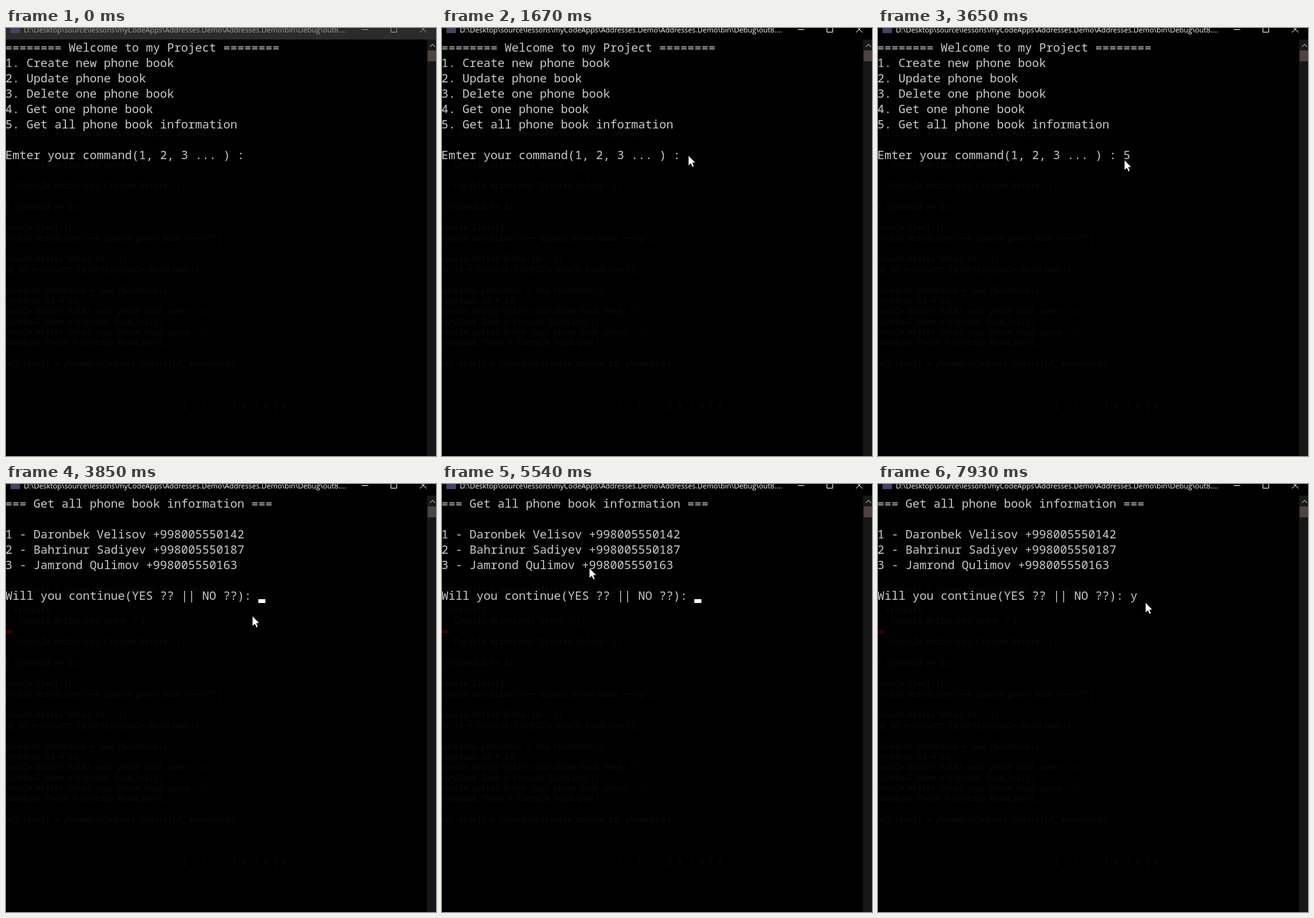
Recreate the animation shown at these times as an HTML page. Size 673 px wide and 669 px high, loop 8 s.

```html
<!DOCTYPE html>
<html lang="en">
<head>
<meta charset="utf-8">
<title>Console</title>
<style>
  html, body { margin: 0; width: 100%; height: 100%; overflow: hidden; background: #000; }
  svg { display: block; width: 100%; height: 100%; }
  text { white-space: pre; }
  .out { font: 18.333px "Noto Sans Mono", "DejaVu Sans Mono", monospace; fill: #ccc; }
  .ghost { font: 11.8px "Noto Sans Mono", "DejaVu Sans Mono", monospace; fill: #0d0d0d; }
  .title { font: 11.35px "Open Sans", "Noto Sans", sans-serif; }
</style>
</head>
<body>
<svg viewBox="0 0 673 669" preserveAspectRatio="none">
  <rect width="673" height="669" fill="#000"/>
  <g id="ghost" class="ghost"></g>
  <g id="ghost2" class="ghost">
    <text x="12" y="201">(result)</text>
    <rect y="228" width="10" height="6" fill="#300000"/>
  </g>

  <rect id="bar" width="673" height="18"/>
  <rect x="7" y="-7" width="15" height="15" fill="#4a3f6b"/>
  <text id="title" class="title" x="28" y="7">D:\Desktop\source\lessons\myCodeApps\Addresses.Demo\Addresses.Demo\bin\Debug\out8....</text>
  <path id="buttons" d="M557 2.5H567M602.5 -3V6.5H611.5V-3M648 -3L658 7M658 -3L648 7" fill="none"/>

  <rect x="659" y="18" width="14" height="651" fill="#171717"/>
  <path d="M663.5 29.5L667.5 25.5L671.5 29.5" fill="none" stroke="#868686" stroke-width="1.5"/>
  <rect x="660" y="35" width="13" height="17" fill="#4d4340"/>

  <g id="menu" class="out"></g>
  <g id="list" class="out"></g>
  <text id="typed" class="out"></text>
  <rect id="caret" width="11" height="6" fill="#fff"/>
  <path id="mouse" d="M0 0V16.5L3.8 12.9L6.3 18.5L9 17.3L6.6 11.8H11.5Z" fill="#fff" stroke="#000" stroke-width=".8"/>
</svg>
<script>
const LOOP = 8000, CELL = 11, LINE = 24;
const ENTRY = 320, FOCUS = 1540, ENTER = 3520, LIST = 3780, ANSWER = 7930;
const BLINK = 527, BLINK_ON = 2078;

const $ = id => document.getElementById(id);
const set = (el, attrs) => { for (const k in attrs) el.setAttribute(k, attrs[k]); };
const show = (el, on) => set(el, { visibility: on ? "visible" : "hidden" });
const column = n => n * CELL - 1;
const baseline = row => 37 + row * LINE;

function print(id, lines, x, top, pitch) {
  lines.forEach((line, row) => {
    if (!line) return;
    const el = document.createElementNS("http://www.w3.org/2000/svg", "text");
    set(el, { x, y: top + row * pitch });
    el.textContent = line;
    $(id).append(el);
  });
}

const menu = [
  "======== Welcome to my Project ========",
  "1. Create new phone book",
  "2. Update phone book",
  "3. Delete one phone book",
  "4. Get one phone book",
  "5. Get all phone book information",
  "",
  "Emter your command(1, 2, 3 ... ) : "
];
const list = [
  "=== Get all phone book information ===",
  "",
  "1 - Daronbek Velisov +998005550142",
  "2 - Bahrinur Sadiyev +998005550187",
  "3 - Jamrond Qulimov +998005550163",
  "",
  "Will you continue(YES ?? || NO ??): "
];
print("menu", menu, column(0), baseline(0), LINE);
print("list", list, column(0), baseline(0), LINE);

// Faint editor showing through the window
print("ghost", [
  "bool result = phoneBookService.Add(id, phoneBook);",
  "", "",
  '    Console.WriteLine("Great !");',
  "",
  '    Console.WriteLine("Created before!");',
  "",
  "if (command == 2)",
  "",
  "Console.Clear();",
  'Console.WriteLine("=== Update phone book ===\\n");',
  "",
  'Console.Write("Enter id: ");',
  "int id = Convert.ToInt32(Console.ReadLine());",
  "",
  "PhoneBook phoneBook = new PhoneBook();",
  "phoneBook.Id = id;",
  'Console.Write("Enter your phone book name: ");',
  "phoneBook.Name = Console.ReadLine();",
  'Console.Write("Enter your phone book phone: ");',
  "phoneBook.Phone = Console.ReadLine();",
  "",
  "bool result = phoneBookService.Update(id, phoneBook);"
], -9, 169, 16.37);
print("ghost", ["- |   |      | ≡  | m | o"], 262, 594, 0);

// Pointer moves: start, end, target x, target y
const moves = [
  [ENTRY, 800, 386, 174],
  [1000, 1200, 386, 199],
  [2080, 2610, 386, 206],
  [4510, 4790, 113, 123],
  [5120, 5540, 231, 131],
  [5540, 5890, 262, 115],
  [5960, 6100, 200, 68],
  [6100, 6300, 170, 163],
  [6300, 6720, 385, 177],
  [6720, 6930, 419, 185]
];
const ease = k => k * k * (3 - 2 * k);

function pointer(t) {
  let x = 598, y = 645;
  for (const [from, to, tx, ty] of moves) {
    const k = ease(Math.min(1, Math.max(0, (t - from) / (to - from))));
    x += (tx - x) * k;
    y += (ty - y) * k;
  }
  return [Math.round(x), Math.round(y)];
}

function caretOn(t) {
  const justPrinted = t >= LIST && t < LIST + BLINK;
  const lit = Math.floor((t - BLINK_ON) / BLINK) % 2 === 0;
  return t >= FOCUS && (justPrinted || lit);
}

function typedAt(t) {
  if (t >= ANSWER) return "y";
  return t >= ENTER && t < LIST ? "5" : "";
}

function draw(t) {
  const active = t >= FOCUS, listed = t >= LIST;
  set($("bar"), { fill: active ? "#000" : "#2b2b2b" });
  set($("title"), { fill: active ? "#fff" : "#a6a6a6" });
  set($("buttons"), { stroke: active ? "#fff" : "#a0a0a0" });

  show($("menu"), !listed);
  show($("list"), listed);
  show($("ghost2"), listed);

  const lines = listed ? list : menu, last = lines.length - 1;
  const x = column(lines[last].length), y = baseline(last);
  const typed = typedAt(t);
  set($("typed"), { x, y });
  $("typed").textContent = typed;
  set($("caret"), { x, y: y - 1 });
  show($("caret"), !typed && caretOn(t));

  const [mx, my] = pointer(t);
  show($("mouse"), t >= ENTRY);
  set($("mouse"), { transform: `translate(${mx - 0.5} ${my})` });
}

const start = performance.now();
function frame() {
  draw((performance.now() - start) % LOOP);
  requestAnimationFrame(frame);
}
frame();
</script>
</body>
</html>
```
